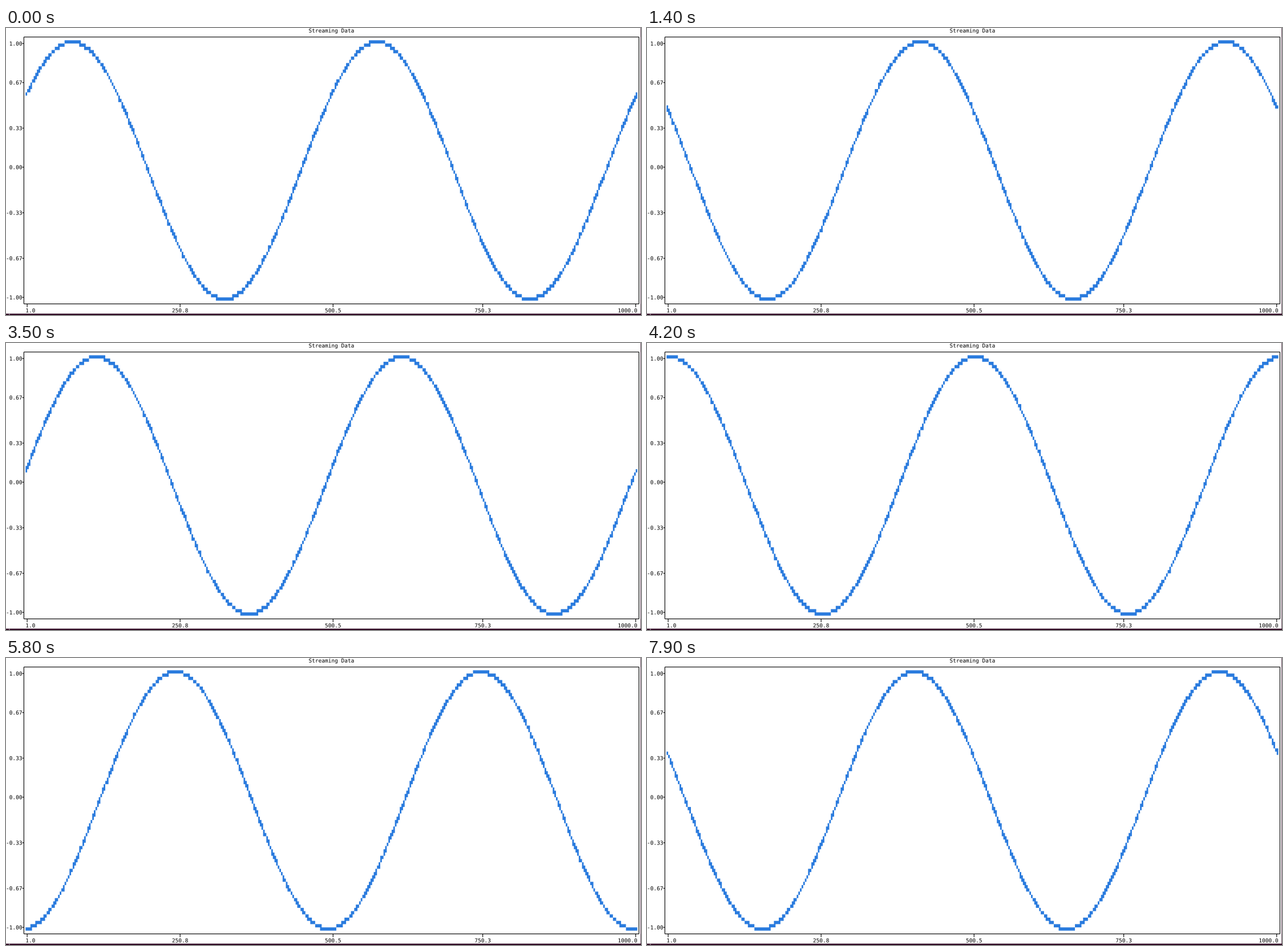
These frames come from a looping animation (1113 by 503 pixels, 8 s). A matplotlib script:

```python
import numpy as np
import matplotlib.pyplot as plt
from matplotlib.animation import FuncAnimation
from matplotlib.colors import LinearSegmentedColormap
from matplotlib.patches import PathPatch, Rectangle
from matplotlib.textpath import TextPath
from matplotlib.transforms import Affine2D

W, H, DPI = 1113, 503, 64
PX = 72 / DPI                         # points per pixel
FRAMES, INTERVAL = 80, 100

# Character grid of the terminal plot
CELL_W, CELL_H = 5.704, 11.408
LEFT, TOP = 34.22, 21.5
COLS, ROWS = 188, 40
POINTS, PERIODS, CYCLE = 1000, 2, 50  # CYCLE: plot updates per full wave shift

INK, BLUE, EDGE = "black", "#2a7bde", "#300a24"
FONT = {"family": "DejaVu Sans Mono"}
FONT_SIZE = CELL_W / 0.602            # the font's advance is 0.602 em

fig = plt.figure(figsize=(W / DPI, H / DPI), dpi=DPI, facecolor="white")
ax = fig.add_axes([0, 0, 1, 1])
ax.axis("off")


def col_x(col):
    return LEFT + col * CELL_W


def row_y(row):
    return TOP + row * CELL_H


def line(x0, y0, x1, y1):
    ax.plot([x0, x1], [y0, y1], color=INK, lw=CELL_W / 5 * PX,
            solid_capstyle="butt", snap=False)


def label(text, col, row):
    """Write text starting at the left of a character cell."""
    place = Affine2D().scale(1, -1).translate(col_x(col), row_y(row + 0.5) + 3.5)
    path = TextPath((0, 0), text, size=FONT_SIZE, prop=FONT)
    ax.add_patch(PathPatch(place.transform_path(path), color=INK, lw=0,
                           snap=False))


def draw_axes():
    x0, x1 = col_x(-0.5), col_x(COLS + 0.5)
    y0, y1 = row_y(-0.5), row_y(ROWS + 0.5)
    for seg in ((x0, y0, x1, y0), (x0, y1, x1, y1),
                (x0, y0, x0, y1), (x1, y0, x1, y1)):
        line(*seg)

    label("Streaming Data", 87, -2)
    for value, row in zip(np.linspace(1, -1, 7), (0, 6, 13, 19, 26, 33, 39)):
        label(f"{value:5.2f}", -6, row)
        line(col_x(-1), row_y(row + 0.5), x0, row_y(row + 0.5))

    starts = (0, 45, 92, 138, 182)
    names = ("1.0", "250.8", "500.5", "750.3", "1000.0")
    for name, start, tick in zip(names, starts, (0, 47, 94, 140, 187)):
        label(name, start, ROWS + 1)
        line(col_x(tick + 0.5), y1, col_x(tick + 0.5), row_y(ROWS + 1))


def draw_window_edge():
    right, bottom = col_x(COLS + 1), row_y(ROWS + 2)
    for x, y, w, h, color in ((0, bottom, W, 4, EDGE), (right, 0, 4, H, EDGE),
                              (5.5, bottom, 0.8, 4, "#d8d0d6")):
        ax.add_patch(Rectangle((x, y), w, h, color=color, lw=0, snap=False))


def coverage(size, start, step, count):
    """Share of each pixel (row) covered by each block (column)."""
    pixel = np.arange(size)[:, None]
    block = start + step * np.arange(count)
    overlap = np.minimum(pixel + 1, block + step) - np.maximum(pixel, block)
    return overlap.clip(0, 1)


def update_count(frame):
    """Number of plot updates so far, with two short stalls."""
    times = (0, 1, 2, 7, 22, 24, 25, 35, 49, 67, 79)
    counts = (5, 6.5, 6.5, 14, 31, 34 + 1 / 3, 34 + 1 / 3, 51, 74, 103, 122)
    return int(np.interp(frame, times, counts) + 1e-6)


NX, NY = 2 * COLS, 2 * ROWS
COVER_X = coverage(W, LEFT, CELL_W / 2, NX)
COVER_Y = coverage(H, TOP, CELL_H / 2, NY)


def wave_image(count):
    """Scatter the sine on half-cell blocks and scale it to pixels."""
    t = np.arange(POINTS) / (POINTS - 1)
    y = np.sin(2 * np.pi * (PERIODS * t + count / CYCLE))
    y = (y - y.min()) / (y.max() - y.min())
    blocks = np.zeros((NY, NX))
    rows = NY - 1 - (y * (NY - 1) + 0.5).astype(int)
    blocks[rows, (t * (NX - 1) + 0.5).astype(int)] = 1
    return COVER_Y @ blocks @ COVER_X.T


wave = ax.imshow(wave_image(update_count(0)), vmin=0, vmax=1, aspect="auto",
                 cmap=LinearSegmentedColormap.from_list("wave", ["white", BLUE]),
                 interpolation="nearest", extent=(0, W, H, 0))
draw_axes()
draw_window_edge()
ax.set_xlim(0, W)
ax.set_ylim(H, 0)


def draw(frame):
    wave.set_data(wave_image(update_count(frame)))
    return [wave]


anim = FuncAnimation(fig, draw, frames=FRAMES, interval=INTERVAL,
                     repeat=True, repeat_delay=0)
plt.show()
```
